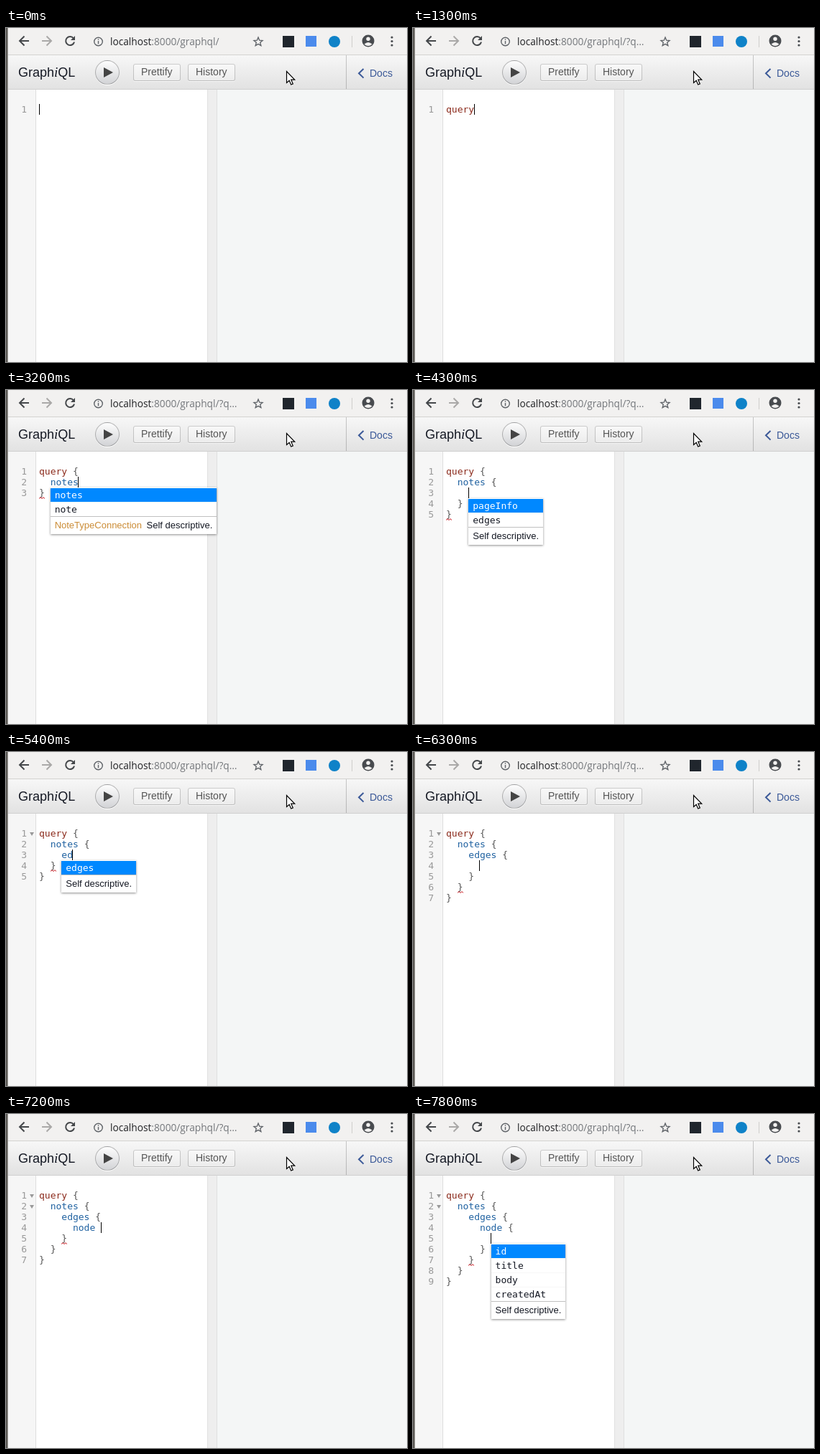
Write an HTML page that moves like this. It is 558x466 px and loops after 8 s.

```html
<!DOCTYPE html>
<html lang="en">
<head>
<meta charset="utf-8">
<title>Query editor</title>
<style>
  html, body { margin: 0; width: 100%; height: 100%; overflow: hidden; }
  #stage { position: relative; width: 558px; height: 466px; overflow: hidden; background: #fff;
    font: 14px "Liberation Sans", Arial, sans-serif; }
  #stage div, #stage svg { position: absolute; box-sizing: border-box; white-space: pre; }
  .mono { font: 13px/15px "DejaVu Sans Mono", monospace; }

  .browser { left: 0; top: 0; width: 558px; height: 38px; background: #f2f1f0; border-bottom: 1px solid #d3d2d0; }
  .edge { left: 0; top: 0; width: 3px; height: 466px; background: #5b5955; border-right: 1px solid #a3a19d; }
  .url { left: 145px; top: 9px; font: 13.7px/20px "Open Sans", "Noto Sans", sans-serif; color: #74777b; }
  .url b { font-weight: 400; color: #202124; }

  .bar { left: 3px; top: 38px; width: 555px; height: 48px;
    background: linear-gradient(#f7f7f7, #e2e2e2); border-bottom: 1px solid #d0d0d0; }
  .title { left: 17px; top: 51px; font-size: 18px; line-height: 22px; color: #141823; }
  .title em { font: italic 19px/20px "Liberation Serif", serif; }
  .run { left: 124px; top: 45px; width: 34px; height: 34px; border-radius: 17px;
    background: linear-gradient(#fdfdfd, #d2d3d6); border: 1px solid rgba(0,0,0,.25); box-shadow: 0 1px 0 #fff; }
  .button { top: 50px; height: 24px; padding: 3px 11px 5px; line-height: 16px; color: #555; border-radius: 3px;
    background: linear-gradient(#f9f9f9, #ececec);
    box-shadow: inset 0 0 0 1px rgba(0,0,0,.2), 0 1px 0 rgba(255,255,255,.7), inset 0 1px #fff; }
  .docs { left: 473px; top: 38px; width: 85px; height: 47px; border-left: 1px solid rgba(0,0,0,.2);
    padding-left: 32px; line-height: 50px; color: #3b5998; }

  .gutter { left: 3px; top: 86px; width: 39px; height: 380px; background: #f6f6f6; border-right: 1px solid #ddd; }
  .split { left: 280px; top: 86px; width: 14px; height: 380px; background: #eee; border: solid #e0e0e0; border-width: 0 1px; }
  .result { left: 294px; top: 86px; width: 264px; height: 380px; background: #f4f6f6; }

  .number { left: 3px; width: 26px; text-align: right; color: #999; }
  .fold { left: 33px; width: 6px; height: 5px; background: #999; clip-path: polygon(0 0, 100% 0, 50% 100%); }
  .code { left: 46px; height: 15px; }
  .caret { width: 1px; height: 15px; background: #000; }
  .brace { color: #555; }
  .keyword { color: #8b2a1b; }
  .property { color: #1f61a0; }
  .invalid { color: #f00; }

  .hints { background: #fff; box-shadow: 0 1px 3px rgba(0,0,0,.45); }
  .hints p { margin: 0; padding: 2px 6px; border-top: 1px solid #f7f7f7; color: #141823; }
  .hints p:first-child { background: #08f; background-clip: padding-box; border-top-color: #fff; color: #fff; }
  .hints footer { border-top: 1px solid #c0c0c0; padding: 4px 6px; color: #141823;
    font: 13px/16px "Liberation Sans", Arial, sans-serif; }
  .hints i { font-style: normal; color: #cb8c36; margin-right: .5em; }
</style>
</head>
<body>
<div id="stage">
  <div class="browser"></div>
  <div class="url"><b>localhost</b>:8000/graphql/<span id="query"></span></div>
  <div class="bar"></div>
  <div class="title">Graph<em>i</em>QL</div>
  <div class="run"></div>
  <div class="button" style="left:177px">Prettify</div>
  <div class="button" style="left:253px">History</div>
  <div class="docs">Docs</div>
  <div class="gutter"></div>
  <div class="split"></div>
  <div class="result"></div>
  <div class="edge"></div>
  <div id="editor" class="mono"></div>
  <svg width="558" height="90" viewBox="0 0 558 90" style="left:0;top:0" fill="none">
    <g stroke="#45484b" stroke-width="2">
      <path d="M32 18H19.500M25.500 11.500L19 18L25.500 24.500"/>
      <path d="M50 18H62.500M56.500 11.500L63 18L56.500 24.500" stroke="#aaa9a8"/>
      <path d="M94 14.500A6 6 0 1 0 95 19.500"/>
    </g>
    <path d="M96 11V17H90Z" fill="#45484b"/>
    <g stroke="#5f6368" stroke-width="1.400">
      <circle cx="128.500" cy="19" r="5.800"/>
      <path d="M128.500 18V22.300M128.500 15.300V16.800"/>
      <path d="M351 13L352.700 17.200L357 17.500L353.700 20.300L354.800 24.600L351 22.300L347.200 24.600L348.300 20.300L345 17.500L349.300 17.200Z"/>
    </g>
    <rect x="385" y="11" width="16" height="16" fill="#20262d"/>
    <rect x="417" y="11" width="15" height="15" fill="#4b8bec"/>
    <circle cx="457" cy="19" r="8" fill="#0f82c8"/>
    <path d="M481.500 11V27" stroke="#cfcecc"/>
    <circle cx="504" cy="18" r="8.500" fill="#484b4f"/>
    <circle cx="504" cy="15.300" r="2.700" fill="#f2f1f0"/>
    <path d="M498.500 22.500Q504 17.500 509.500 22.500Q504 27.500 498.500 22.500Z" fill="#f2f1f0"/>
    <g fill="#484b4f">
      <circle cx="537" cy="13" r="1.600"/><circle cx="537" cy="18.500" r="1.600"/><circle cx="537" cy="24" r="1.600"/>
    </g>
    <path d="M136 55L149 62L136 69Z" fill="#444"/>
    <path d="M497.500 57L491 63.300L497.500 69.600" stroke="#3b5998" stroke-width="2"/>
    <path d="M390.500 60.500V76.500L394.200 73.200L396.700 79L399.300 77.900L396.800 72.200H401.700Z" fill="#fff" stroke="#000" stroke-width="1.200"/>
  </svg>
</div>
<script>
const LOOP = 8000, LEFT = 46, TOP = 106, ROW = 15, COL = 7.826;

// Hint details: [type, description]
const PLAIN = ['', 'Self descriptive.'];
const INFO = {
  notes: ['NoteTypeConnection', PLAIN[1]],
  note: ['NoteType', PLAIN[1]],
  node: ['NoteType', 'The item at the end of the edge'],
};

// Nested blocks closed around the given inner lines
const nest = (heads, inner) => {
  const pad = n => '  '.repeat(n);
  return [...heads.map((h, i) => pad(i) + h + ' {'), pad(heads.length) + inner,
    ...heads.map((h, i) => pad(i) + '}').reverse()].join('\n');
};
const inQuery = s => nest(['query'], s);
const inNotes = s => nest(['query', 'notes'], s);
const inEdges = s => nest(['query', 'notes', 'edges'], s);
const inNode = s => nest(['query', 'notes', 'edges', 'node'], s);

// Each step overrides part of the state; "|" marks the caret, lint is a row
const STEPS = [
  [0, { doc: '|', hint: '', lint: -1, folds: 0 }],
  [400, { doc: '' }],
  [800, { doc: 'q|', hint: 'query {' }],
  [900, { doc: 'qu|', hint: 'query' }],
  [1000, { doc: 'que|' }],
  [1100, { doc: 'quer|' }],
  [1300, { doc: 'query|', hint: '' }],
  [1500, { doc: 'query |' }],
  [1700, { doc: 'query {|}' }],
  [1900, { doc: inQuery('|') }],
  [2400, { doc: inQuery(''), lint: 2 }],
  [2900, { doc: inQuery('n|'), hint: 'note notes' }],
  [3000, { doc: inQuery('no|') }],
  [3100, { doc: inQuery('note|') }],
  [3200, { doc: inQuery('notes|'), hint: 'notes note' }],
  [3400, { doc: inQuery('notes |'), hint: '' }],
  [3800, { doc: inQuery('notes {|}') }],
  [4000, { doc: inNotes('|'), lint: 4 }],
  [4300, { hint: 'pageInfo edges' }],
  [4500, { lint: 3 }],
  [4600, { folds: 1 }],
  [4800, { off: true }],
  [5200, { doc: inNotes('e|'), hint: 'edges pageInfo', off: false }],
  [5400, { doc: inNotes('ed|'), hint: 'edges' }],
  [5600, { doc: inNotes('edg|') }],
  [5700, { doc: inNotes('edge|') }],
  [5800, { doc: inNotes('edges|') }],
  [5900, { doc: inNotes('edges |'), hint: '' }],
  [6100, { doc: inNotes('edges {|}') }],
  [6300, { doc: inEdges('|'), lint: 5 }],
  [6500, { hint: 'node cursor' }],
  [6700, { doc: inEdges('n|'), hint: 'node' }],
  [6800, { doc: inEdges('no|'), lint: 4 }],
  [6900, { doc: inEdges('nod|'), folds: 2 }],
  [7000, { doc: inEdges('node|') }],
  [7200, { doc: inEdges('node |'), hint: '' }],
  [7400, { doc: inEdges('node {|}') }],
  [7700, { doc: inNode('|'), lint: 6 }],
  [7800, { hint: 'id title body createdAt' }],
];

let last = {};
const states = STEPS.map(([at, change]) => (last = { ...last, ...change, at }));

const box = (cls, x, y, body = '') =>
  `<div class="${cls}" style="${x === null ? '' : `left:${x}px;`}top:${y}px">${body}</div>`;

const paint = (line, row) => line.replace(/[{}]|\w+/g, word => {
  const kind = /[{}]/.test(word) ? 'brace' : word === 'query' ? 'keyword' : row ? 'property' : 'invalid';
  return `<span class="${kind}">${word}</span>`;
});

const squiggle = (x, y) =>
  `<svg width="10" height="4" style="left:${x}px;top:${y}px"><path d="M0 2.500L2 .7L4 2.500L6 .7L8 2.500" fill="none" stroke="#c8141c"/></svg>`;

function popup(names, x, y) {
  const list = names.split(' ');
  const [type, text] = INFO[list[0]] || PLAIN;
  return box('hints', x, y, list.map(n => `<p>${n}</p>`).join('') +
    `<footer>${type && `<i>${type}</i>`}${text}</footer>`);
}

function render({ at, doc, hint, lint, folds, off }) {
  let html = '', overlay = '';
  doc.split('\n').forEach((raw, row) => {
    const y = TOP + row * ROW, line = raw.replace('|', ''), col = raw.indexOf('|');
    html += box('number', null, y, row + 1) + box('code', LEFT, y, paint(line, row));
    if (row < folds) html += box('fold', null, y + 6);
    if (row === lint) html += squiggle(LEFT + line.indexOf('}') * COL, y + 12.5);
    if (col < 0) return;
    if (!off) html += box('caret', Math.floor(LEFT + col * COL), y);
    if (hint) {
      const start = col - raw.slice(0, col).match(/\w*$/)[0].length;
      overlay = popup(hint, LEFT + start * COL, y + ROW);
    }
  });
  document.getElementById('editor').innerHTML = html + overlay;
  document.getElementById('query').textContent = at >= 800 ? '?q…' : '';
}

let shown = null;
const began = performance.now();
function tick() {
  const t = (performance.now() - began) % LOOP;
  const state = states.filter(s => s.at <= t).pop();
  if (state !== shown) render(shown = state);
  requestAnimationFrame(tick);
}
tick();
</script>
</body>
</html>
```
